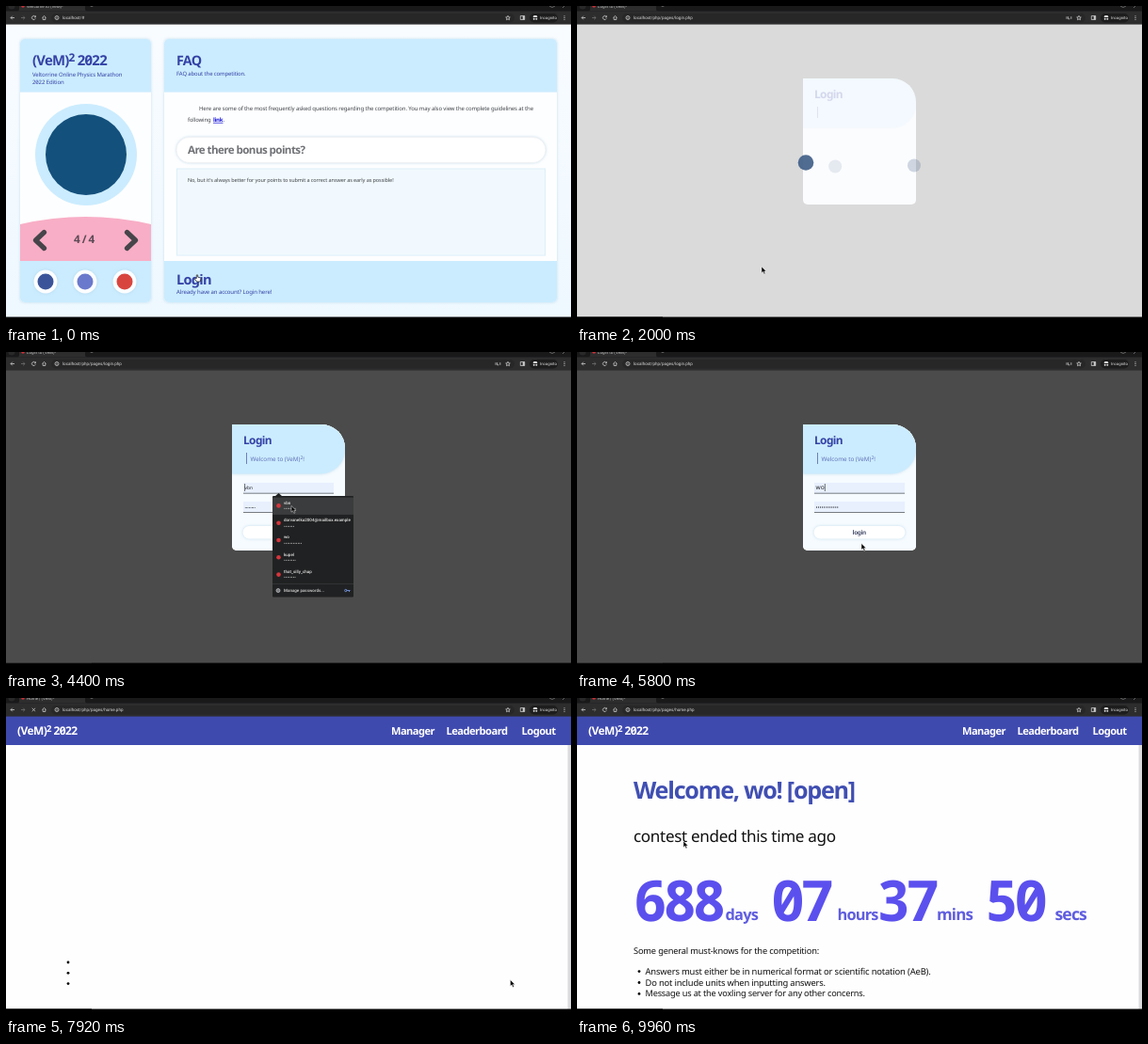
An HTML page that plays this animation: 600x338 px, repeating every 10000 ms.

```html
<!DOCTYPE html>
<html lang="en">
<head>
<meta charset="utf-8">
<title>Contest walkthrough</title>
<style>
html, body { margin: 0; width: 100%; height: 100%; overflow: hidden; background: #000; }
svg { display: block; width: 100vw; height: 100vh; }
text { font-family: "Noto Sans", "Open Sans", sans-serif; letter-spacing: -.02em; font-feature-settings: "zero"; text-rendering: geometricPrecision; }
.ui, .ui text { font-family: Roboto, "Open Sans", sans-serif; letter-spacing: 0; }
.form { font-family: "Open Sans", "Noto Sans", sans-serif; letter-spacing: 0; }
.m { font-weight: 500; }
.s { font-weight: 600; letter-spacing: -.05em; }
.b { font-weight: 700; letter-spacing: -.05em; }
.num { font-family: "Noto Sans Mono", "DejaVu Sans Mono", monospace; font-weight: 600; letter-spacing: -.08em; }
.soft { filter: drop-shadow(0 0 1.5px #9cc4dc88); }
</style>
</head>
<body>
<svg viewBox="0 0 600 338" preserveAspectRatio="none">
  <defs>
    <linearGradient id="sky" x2="0" y2="1"><stop stop-color="#f9fcff"/><stop offset="1" stop-color="#eef8ff"/></linearGradient>
    <clipPath id="left"><rect x="15" y="35" width="139" height="280" rx="5"/></clipPath>
    <clipPath id="right"><rect x="168" y="35" width="417" height="280" rx="5"/></clipPath>
    <clipPath id="modal"><path d="M240 77H335A25 25 0 0 1 360 102V206a5 5 0 0 1-5 5H245a5 5 0 0 1-5-5Z"/></clipPath>
  </defs>

  <g id="faq">
    <rect y="19" width="600" height="312" fill="url(#sky)"/>
    <g class="soft"><g clip-path="url(#left)">
      <rect x="15" y="35" width="139" height="280" fill="#fdfeff"/>
      <rect x="15" y="35" width="139" height="56.600" fill="#cbecfe"/>
      <path d="M15 232Q84.500 216 154 232V271H15Z" fill="#f8aec6"/>
      <rect x="15" y="271" width="139" height="44" fill="#cbecfe"/>
    </g></g>
    <g class="soft"><g clip-path="url(#right)">
      <rect x="168" y="35" width="417" height="280" fill="#fdfeff"/>
      <rect x="168" y="35" width="417" height="56.600" fill="#cbecfe"/>
      <rect x="168" y="271" width="417" height="44" fill="#cbecfe"/>
    </g></g>
    <circle cx="85" cy="158" r="54" fill="#cbecfe"/>
    <circle cx="85" cy="158" r="43" fill="#14507c"/>
    <path d="M40.500 240.500L31.500 249L40.500 257.500M128.500 240.500L137.500 249L128.500 257.500" fill="none" stroke="#47454a" stroke-width="5.200" stroke-linecap="round" stroke-linejoin="round"/>
    <g id="links"></g>
    <g class="soft"><rect x="181" y="139.500" width="392" height="27" rx="13.500" fill="#fff" stroke="#eef0f2" stroke-width=".7"/></g>
    <rect x="181.500" y="173" width="391" height="92" fill="#f1f9fe" stroke="#dceff8"/>
    <g id="faqText"></g>
    <path d="M220 124.300H230.500" stroke="#1412d8" stroke-width=".7"/>
  </g>

  <g id="login">
    <rect y="19" width="600" height="312" fill="#fefefe"/>
    <rect id="dim" y="19" width="600" height="312"/>
    <g clip-path="url(#modal)">
      <rect x="240" y="77" width="120" height="135" fill="#fdfdfe"/>
      <g id="card">
        <rect x="240" y="77" width="120" height="135" fill="#f5fbff"/>
        <g class="soft"><path d="M240 77H360V104A26 26 0 0 1 334 129.500H240Z" fill="#cbecfe"/></g>
        <path d="M255.500 107V119" stroke="#6272b5" stroke-width=".9"/>
        <g id="cardText"></g>
      </g>
      <g id="form">
        <g id="filled" fill="#e8f0fe"><rect x="252" y="139" width="96" height="11"/><rect x="252" y="159" width="96" height="11"/></g>
        <path d="M252 150.200H348M252 170.500H348" stroke="#555b62" stroke-width=".8"/>
        <text id="user" class="form" x="253.500" y="146.200"></text>
        <text id="pass" class="form" x="253.500" y="166.800"></text>
        <path id="caret" d="M0 140V148" stroke="#111" stroke-width=".6"/>
        <g class="soft"><rect x="251.500" y="185" width="97" height="13.500" rx="6.700" fill="#fff"/></g>
        <g id="formText"></g>
      </g>
    </g>
    <g id="balls" fill="#426088"></g>
    <g id="menu" class="ui">
      <path d="M285.500 153.500L289.500 150L293.500 153.500Z" fill="#202122"/>
      <rect x="283" y="153" width="86" height="107.500" rx="1" fill="#202122"/>
      <rect id="hover" x="283" width="86" height="18.300" fill="#3b3c3d"/>
      <path d="M283 246.500H369" stroke="#3f4042" stroke-width=".6"/>
      <circle cx="289" cy="253.500" r="2" fill="#77797c" stroke="#c4c7c9" stroke-width=".7"/>
      <path d="M361.500 253.500H365.500M364.500 253.500V255" stroke="#7b9ee8" stroke-width=".8"/>
      <circle cx="360.800" cy="253.500" r="1.200" fill="none" stroke="#7b9ee8" stroke-width=".8"/>
      <g id="menuText"></g>
    </g>
  </g>

  <g id="home">
    <rect y="19" width="600" height="312" fill="#fefefe"/>
    <rect x="596.500" y="50" width="3.500" height="281" fill="#dcdcde"/>
    <rect y="19" width="600" height="31" fill="#3f4aaf"/>
    <g id="navText"></g>
    <g id="bullets"><circle cx="66" r="1.400"/><circle cx="66" r="1.400"/><circle cx="66" r="1.400"/></g>
    <g id="content"></g>
  </g>

  <g class="ui">
    <rect width="600" height="19.600" fill="#2d2d2e"/>
    <rect width="600" height="5.500" fill="#19191a"/>
    <path d="M12 5.500Q14 5.500 14 3V0H84V3Q84 5.500 86 5.500Z" fill="#2d2d2e"/>
    <circle cx="18" cy="0" r="1.800" fill="#d12e35"/>
    <circle cx="6" cy="0" r="3.500" fill="#29292a"/>
    <path d="M89.500 0H92.500M91 -1V1M577 0L580 1.500L583 0M593 0L591 2" stroke="#999" stroke-width=".6" fill="none"/>
    <text id="tab" x="22" y="1.500" font-size="4.500" fill="#bbb"></text>
    <rect x="48" y="8" width="492" height="9.500" rx="4.700" fill="#272728"/>
    <g fill="none" stroke="#c9c9c9" stroke-width=".8">
      <path d="M9 12.500H5M6.800 10.700L5 12.500L6.800 14.300"/>
      <path d="M16 12.500H20M18.200 10.700L20 12.500L18.200 14.300" stroke="#707070"/>
      <path id="reload" d="M31.200 11.500A2 2 0 1 0 31.300 13.300M31.500 10.300V11.800H30"/>
      <path id="stop" d="M27.700 10.800L31.100 14.200M31.100 10.800L27.700 14.200"/>
      <path d="M38.500 12.300L40.500 10.500L42.500 12.300M39.200 12V14.500H41.800V12"/>
      <circle cx="54" cy="12.500" r="2"/><path d="M54 12.200V13.700M54 11.100V11.600"/>
      <path id="key" d="M520 11.200V13.800M521.700 11.200V13.800H523.300M524.800 11.200V13.800"/>
      <path d="M533 10.300L533.700 11.800L535.300 12L534.100 13L534.500 14.700L533 13.800L531.500 14.700L531.900 13L530.700 12L532.300 11.800Z"/>
      <path d="M546.300 10.500H550.700V14.500H546.300Z"/><path d="M549.700 10.500V14.500" stroke-width="2"/>
    </g>
    <rect x="556" y="8" width="30" height="9.500" rx="4.700" fill="#1d1d1e"/>
    <path d="M559.500 12H564.500L563.500 10H560.500Z" fill="#ddd"/>
    <g fill="#ddd"><circle cx="560.700" cy="13.700" r="1"/><circle cx="563.300" cy="13.700" r="1"/>
      <circle cx="593" cy="10.700" r=".55"/><circle cx="593" cy="12.500" r=".55"/><circle cx="593" cy="14.300" r=".55"/></g>
    <text x="567" y="14.200" font-size="4.300" fill="#e4e4e4">Incognito</text>
    <text id="url" x="60" y="14.200" font-size="4.550" fill="#dedede"></text>
  </g>
  <rect y="330.500" width="600" height="8" fill="#000"/>
  <rect id="status" y="330" width="91" height=".9" fill="#303030"/>
  <g id="cursor">
    <path id="arrow" d="M0 0V6.700L1.600 5.300L2.800 7.900L4 7.300L2.800 4.900H5Z" fill="#000" stroke="#fff" stroke-width=".45"/>
    <path id="hand" d="M-.7 4V.5Q0-.6.7.5V2.600L3.400 3.400Q4 3.700 3.900 4.500L3.200 7.500H-.3L-2.700 4.600Q-2.300 3.600-1.500 4.200Z" fill="#fff" stroke="#111" stroke-width=".7"/>
  </g>
</svg>
<script>
const LOOP = 10000;
const $ = id => document.getElementById(id);
const clamp = v => Math.min(1, Math.max(0, v));
const smooth = v => (v = clamp(v), v * v * (3 - 2 * v));
const show = (id, on) => { $(id).style.display = on ? '' : 'none'; };
const opacity = (id, v) => $(id).setAttribute('opacity', v);
const put = (id, html) => { $(id).innerHTML = html; };
const label = (id, s) => { if ($(id).textContent !== s) $(id).textContent = s; };

// Each line: x, baseline, size, colour, text, class
const lines = rows => rows.map(([x, y, s, c, txt, k = 'm']) =>
  `<text x="${x}" y="${y}" font-size="${s}" fill="${c}" class="${k}">${txt}</text>`).join('');

const squared = tail => `(VeM)<tspan dy="-.35em" font-size="80%">2</tspan><tspan dy=".28em">${tail}</tspan>`;
const NAVY = '#3442a6', INK = '#414448';

put('links', [[42, '#3b5499'], [84, '#6b79cc'], [126, '#d8453e']].map(([x, c]) =>
  `<circle class="soft" cx="${x}" cy="293" r="12.500" fill="#fbfdff"/><circle cx="${x}" cy="293" r="8.500" fill="${c}"/>`).join(''));

put('faqText', lines([
  [28, 63, 14.9, NAVY, squared(' 2022'), 'b'],
  [28, 75.3, 6, NAVY, 'Veltorrine Online Physics Marathon'],
  [28, 83.3, 6, NAVY, '2022 Edition'],
  [72, 251.5, 11.8, '#5c4a55', '4 / 4', 's'],
  [181, 63, 14.3, NAVY, 'FAQ', 'b'],
  [181, 73.5, 5.95, NAVY, 'FAQ about the competition.'],
  [205, 111.3, 6, INK, 'Here are some of the most frequently asked questions regarding the competition. You may also view the complete guidelines at the'],
  [193, 123.3, 5.9, INK, 'following'],
  [220, 123.3, 6, '#1412d8', 'link', 'b'],
  [230.5, 123.3, 6, INK, '.'],
  [193, 157, 11.6, '#707276', 'Are there bonus points?', 's'],
  [193, 186.5, 5.55, INK, "No, but it's always better for your points to submit a correct answer as early as possible!"],
  [181, 296, 14.6, NAVY, 'Login', 'b'],
  [181, 306.3, 6.05, NAVY, 'Already have an account? Login here!']
]));

put('cardText', lines([[252, 98, 11.9, NAVY, 'Login', 'b']]));
put('formText', lines([
  [259.5, 115.8, 6.3, '#5a69b4', 'Welcome to ' + squared('!'), 'form'],
  [292.5, 194, 6.4, '#4d5470', 'login', 's']
]));

const users = [['vbn', 8], ['dorvanelka2004@mailbox.example', 7], ['wo', 12], ['kupel', 8], ['that_silly_chap', 8]];
const ROW = 18.3, TOP = 154.6;
put('menuText', users.map(([name, n], i) => {
  const y = TOP + i * ROW;
  return `<circle cx="289.500" cy="${y + 8.800}" r="2.300" fill="#d5363c"/>` + lines([
    [295, y + 7.2, 4.5, '#e6e6e6', name],
    [295, y + 13.6, 4.6, '#c8c8c8', '•'.repeat(n)]]);
}).join('') + lines([[295, 255, 4.5, '#d5d5d5', 'Manage passwords...']]));

put('navText', lines([
  [12, 39, 12, '#fff', squared(' 2022'), 'b'],
  [409, 39, 11.1, '#fff', 'Manager', 'b'],
  [467.5, 39, 11.2, '#fff', 'Leaderboard', 'b'],
  [547.5, 39, 11.2, '#fff', 'Logout', 'b']
]));

const DIGIT = '#5b50ee', UNIT = '#5f5ddf';
put('content', lines([
  [60, 106.5, 25.2, '#404fb2', 'Welcome, wo! [open]', 's'],
  [60, 152.5, 17.1, '#101010', 'contest ended this time ago'],
  [60, 237, 60, DIGIT, '688', 'num'],
  [157.5, 235.5, 16.4, UNIT, 'days', 's'],
  [206, 237, 60, DIGIT, '07', 'num'],
  [276.5, 235.5, 16.4, UNIT, 'hours', 's'],
  [318, 237, 60, DIGIT, '37', 'num'],
  [382, 235.5, 17, UNIT, 'mins', 's'],
  [433, 237, 60, DIGIT, '<tspan id="secs">48</tspan>', 'num'],
  [507.5, 235.5, 17.6, UNIT, 'secs', 's'],
  [60, 271.5, 9.3, '#111', 'Some general must-knows for the competition:'],
  [72.5, 293.5, 9.45, '#111', 'Answers must either be in numerical format or scientific notation (AeB).'],
  [72.5, 305.5, 9.4, '#111', 'Do not include units when inputting answers.'],
  [72.5, 317.3, 9.2, '#111', 'Message us at the voxling server for any other concerns.']
]));

put('balls', [8.3, 7, 7].map(r => `<circle r="${r}"/>`).join(''));
const balls = [...$('balls').children];
const dots = [...$('bullets').children];

// Pointer path: time, x, y
const path = [
  [0, 203, 285.5], [440, 202, 284], [1640, 202, 284], [1900, 196, 277], [2000, 196, 277],
  [2360, 311, 159.5], [2680, 300, 144], [3600, 300, 146], [4000, 302, 162], [4400, 303, 163.5],
  [4720, 304, 180], [4960, 305, 197], [5240, 305, 198], [5600, 302, 203.5], [5800, 302, 203.5],
  [6080, 302, 192], [6560, 302, 192], [7400, 535.5, 299.5], [8200, 535.5, 299.5], [9600, 113, 152], [LOOP, 113, 152]
];
function pointer(t) {
  const i = path.findIndex(p => p[0] > t);
  const [a, b] = [path[i - 1], path[i]];
  const f = smooth((t - a[0]) / (b[0] - a[0]));
  return [a[1] + (b[1] - a[1]) * f, a[2] + (b[2] - a[2]) * f];
}

const PAGE = { login: 1640, menu: 3000, pick: 5160, home: 7880, text: 8320 };

function drawForm(t, y) {
  const fade = smooth((t - 1786) / 745);
  opacity('dim', .702 * fade);
  opacity('card', fade);
  opacity('form', smooth((t - 2050) / 380));

  const open = t >= PAGE.menu && t < PAGE.pick;
  const row = Math.floor((y - TOP) / ROW);
  const hot = open && row >= 0;
  const picked = t >= PAGE.pick;
  const who = picked ? users[2] : hot ? users[row] : null;
  show('menu', open);
  show('hover', hot);
  if (hot) $('hover').setAttribute('y', TOP + row * ROW);
  show('filled', who);
  label('user', who ? who[0] : 'Enter username');
  label('pass', who ? '•'.repeat(who[1]) : 'Enter password');
  const [userSize, passSize] = picked ? [6.6, 5.4] : who ? [4.9, 3.8] : [6.35, 6.35];
  [['user', userSize], ['pass', passSize]].forEach(([id, size]) => {
    $(id).setAttribute('font-size', size);
    $(id).setAttribute('fill', who ? '#15171a' : '#757a80');
  });
  show('caret', t >= PAGE.menu && t < 6200);
  $('caret').setAttribute('transform', `translate(${picked ? 263.3 : 253.6} 0)`);

  const u = (t - 2000) / 180;
  const gone = 1 - clamp((t - 2000) / 160);
  [[-Math.cos(u), 166.5, .93], [Math.cos(u), 169.5, .24], [-Math.cos(u + 1.09), 170.5, .12]].forEach(([c, cy, a], i) => {
    balls[i].setAttribute('cx', 300.5 + 57.5 * c);
    balls[i].setAttribute('cy', cy);
    balls[i].setAttribute('opacity', a * gone);
  });
}

function drawHome(t) {
  const ready = t >= PAGE.text;
  show('content', ready);
  dots.forEach((d, i) => d.setAttribute('cy', ready ? 290.6 + 11.9 * i : 281 + 11.3 * i));
  label('secs', String(48 + Math.max(0, Math.floor((t - 7960) / 1000))));
}

function draw(t) {
  const [x, y] = pointer(t);
  const page = t < PAGE.login ? 'faq' : t < PAGE.home ? 'login' : 'home';
  ['faq', 'login', 'home'].forEach(p => show(p, p === page));
  if (page === 'login') drawForm(t, y);
  if (page === 'home') drawHome(t);

  const early = t < 1480;
  label('url', early ? 'localhost/#' : `localhost/php/pages/${page === 'home' ? 'home' : 'login'}.php`);
  label('tab', early ? 'Welcome to (VeM)²' : page === 'home' ? 'Home | (VeM)²' : 'Login to (VeM)²');
  const busy = (t >= 1000 && t < PAGE.login) || (t >= PAGE.home && t < PAGE.text);
  show('stop', busy);
  show('reload', !busy);
  show('key', !early && t < PAGE.home);
  show('status', t >= 240);
  const link = page === 'faq';
  show('hand', link);
  show('arrow', !link);
  $('cursor').setAttribute('transform', `translate(${x} ${y})`);
}

function tick() {
  draw(performance.now() % LOOP);
  requestAnimationFrame(tick);
}
tick();
</script>
</body>
</html>
```
